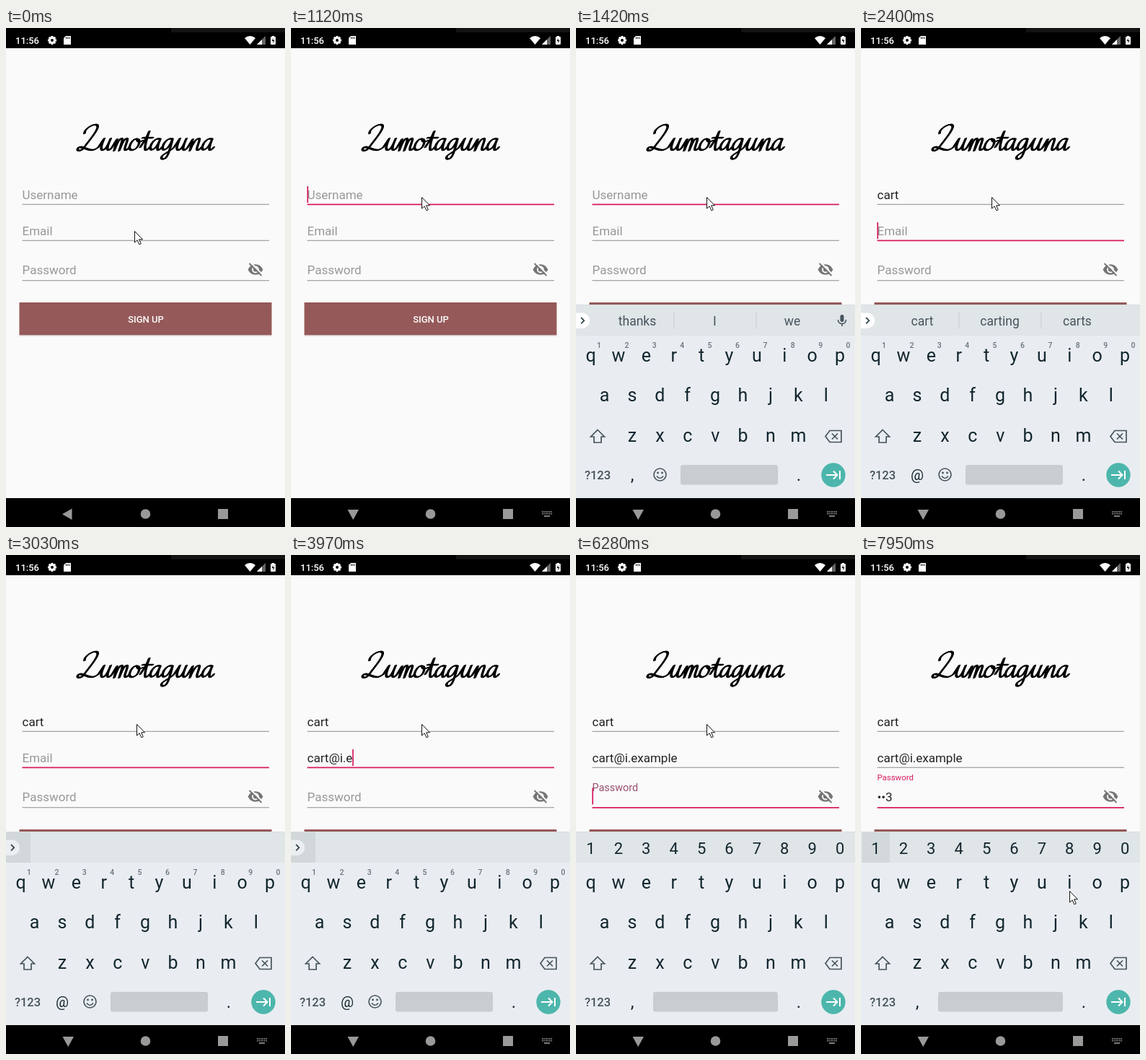
An HTML page with a canvas that plays this animation: 387x691 px, repeating every 8000 ms.

```html
<!DOCTYPE html>
<html lang="en">
<head>
<meta charset="utf-8">
<title>Sign up</title>
<style>
  html, body { margin: 0; width: 100%; height: 100%; overflow: hidden; background: #fafafa; }
  canvas { display: block; width: 387px; height: 691px; }
</style>
</head>
<body>
<canvas id="stage"></canvas>
<script>
const W = 387, H = 691, LOOP = 8000;
const canvas = document.getElementById('stage');
const ctx = canvas.getContext('2d');
const dpr = window.devicePixelRatio || 1;
canvas.width = W * dpr;
canvas.height = H * dpr;

const PINK = '#d81b60', PAPER = '#fafafa', INK = '#12262e', KEY = '#46545b';
const KEY_STEP = 38.4;

// Each entry changes part of the screen state at its time.
const events = [
  [0, { focus: -1, caret: true, values: ['', '', ''], label: 0, slide: 1, layout: 'text', words: ['thanks', 'I', 'we'], mic: true }],
  [700, { focus: 0 }],
  [1120, { typing: true }],
  [1270, { slide: 0.45 }],
  [1420, { slide: 0, caret: false }],
  [1670, { values: ['ca', '', ''], caret: true, words: ['can', 'call', 'car'] }],
  [1820, { values: ['car', '', ''], words: ['car', 'care', 'cars'] }],
  [1980, { values: ['cart', '', ''], words: ['cart', 'carting', 'carts'] }],
  [2250, { focus: 1, layout: 'email', mic: false }],
  [2520, { words: [] }],
  [2650, { pressed: true }],
  [3030, { caret: false }],
  [3560, { values: ['cart', 'ca', ''], caret: true }],
  [3700, { values: ['cart', 'cart', ''], words: ['', 'cart', ''] }],
  [3830, { values: ['cart', 'cart@', ''], words: [] }],
  [3970, { values: ['cart', 'cart@i.e', ''] }],
  [4100, { values: ['cart', 'cart@i.ex', ''] }],
  [4240, { values: ['cart', 'cart@i.exa', ''] }],
  [4830, { caret: false }],
  [4970, { values: ['cart', 'cart@i.exam', ''], caret: true }],
  [5120, { values: ['cart', 'cart@i.examp', ''] }],
  [5270, { values: ['cart', 'cart@i.exampl', ''] }],
  [5410, { values: ['cart', 'cart@i.example', ''] }],
  [5970, { caret: false }],
  [6280, { focus: 2, layout: 'password', caret: true, label: 0.46 }],
  [6400, { label: 0.85 }],
  [6530, { label: 1 }],
  [6670, { values: ['cart', 'cart@i.example', '1'], hit: true }],
  [7070, { values: ['cart', 'cart@i.example', '•2'] }],
  [7500, { values: ['cart', 'cart@i.example', '••3'] }],
  [7950, { caret: false }]
];

const stateAt = t => Object.assign({}, ...events.filter(e => e[0] <= t).map(e => e[1]));
const lerp = (a, b, p) => a + (b - a) * p;
const clamp = v => Math.max(0, Math.min(1, v));

function rect(x, y, w, h, color, r = 0) {
  ctx.fillStyle = color;
  ctx.beginPath();
  if (r) ctx.roundRect(x, y, w, h, r); else ctx.rect(x, y, w, h);
  ctx.fill();
}

function disc(x, y, r, color) {
  ctx.fillStyle = color;
  ctx.beginPath();
  ctx.arc(x, y, r, 0, 7);
  ctx.fill();
}

function text(str, x, y, size, color, align = 'left', weight = 400) {
  ctx.font = `${weight} ${size}px Roboto, sans-serif`;
  ctx.textAlign = align;
  ctx.fillStyle = color;
  ctx.fillText(str, x, y);
}

// Draws an SVG path with its own origin, filled and/or stroked.
function shape(d, x, y, { fill, stroke, width = 1 }) {
  const path = new Path2D(d);
  ctx.save();
  ctx.translate(x, y);
  if (fill) { ctx.fillStyle = fill; ctx.fill(path); }
  if (stroke) { ctx.strokeStyle = stroke; ctx.lineWidth = width; ctx.stroke(path); }
  ctx.restore();
}

// Script letters as joined relative pen strokes.
const bowl = 'm12-11c-6-3-11 4-11 10c0 8 9 6 11-10';
const tail = 'c2 0 3-2 4-4';
const script = {
  L: 'M8-24c-3-8 16-18 16-8c0 8-9 20-12 28c-3 6-10 4-8 0c2-4 12 3 20 3c4 0 6-2 8-4',
  u: 'l5-12c-1 5-3 16 2 16c4 0 6-9 7-16c-1 5-3 16 1 16' + tail,
  n: 'l4-11v16c1-8 4-17 8-17c3 0 1 8 1 12c0 4 1 4 2 4' + tail,
  m: 'l4-11v16c1-8 3-17 6-17c3 0 1 10 1 17c1-8 3-17 6-17c3 0 1 8 1 12c0 4 1 4 2 4' + tail,
  a: bowl + 'c-1 5-2 15 1 15' + tail,
  o: 'm8-11c-5-2-8 5-8 10c0 8 12 6 12-4c0-4-2-6-4-6c1 4 5 4 8 2m-1 9',
  t: 'l5-12l2-10c-1 8-2 26 2 26' + tail + 'm-13-13h14m-1 13',
  g: bowl + 'c0 8 0 20-2 24c-2 5-8 4-7 0c1-4 9-6 14-13'
};
const wordmark = new Path2D([...'Lumotaguna'].map(c => script[c]).join(''));

function drawTitle() {
  ctx.save();
  ctx.transform(1, 0, -0.25, 1, 95, 170);
  ctx.strokeStyle = '#000';
  ctx.lineWidth = 1.7;
  ctx.lineCap = ctx.lineJoin = 'round';
  for (const i of [-1, 0, 1]) {
    ctx.save();
    ctx.translate(i * 0.9, -i * 0.4);
    ctx.stroke(wordmark);
    ctx.restore();
  }
  ctx.restore();
}

function drawStatusBar() {
  rect(0, 0, W, 28, '#000');
  rect(229, 0, W - 229, 6, '#131313');
  text('11:56', 13, 22, 13, '#fff', 'left', 500);
  for (let i = 0; i < 4; i++) {
    ctx.save();
    ctx.translate(64, 17);
    ctx.rotate(i * Math.PI / 4);
    rect(-1.5, -6, 3, 12, '#fff');
    ctx.restore();
  }
  disc(64, 17, 4.7, '#fff');
  disc(64, 17, 2, '#000');
  shape('M3 0H10V12H0V3Z', 80, 11, { fill: '#fff' });
  for (const x of [83, 85.2, 87.4]) rect(x, 12.5, 1, 2.5, '#000');
  shape('M0 3Q7.5-3 15 3L7.5 12Z', 331, 11, { fill: '#fff' });
  shape('M0 12L12 0V12Z', 348, 11, { fill: '#666' });
  shape('M0 12L7 5V12Z', 348, 11, { fill: '#fff' });
  rect(367, 12, 7, 11, '#fff', 1);
  rect(369, 11, 3, 2, '#fff');
  shape('M2 0L0 4H2V7L4 3H2Z', 368.6, 14, { fill: '#000' });
}

function drawNavBar(typing) {
  const gray = '#999';
  rect(0, 651, W, 40, '#000');
  shape(typing ? 'M78.5 667H94L86.2 681Z' : 'M91.5 665.5V681L78 673.2Z', 0, 0, { fill: gray });
  disc(193.5, 673, 6.8, gray);
  rect(294, 666, 14, 14, gray);
  if (!typing) return;
  for (let row = 0; row < 2; row++)
    for (let i = 0; i < 6; i++) rect(348 + i * 2.5, 669 + row * 2.8, 1.6, 1.7, '#888');
  rect(351, 675, 8, 1.8, '#888');
}

function drawEye() {
  const gray = '#757575';
  shape('M-10.5 0Q-7-7.2 0-7.2T10.5 0Q7 7.2 0 7.2T-10.5 0Z', 346, 334.5, { fill: gray });
  disc(346, 334.5, 4.9, PAPER);
  disc(346, 334.5, 3, gray);
  shape('M-7-10L10 7', 346, 334.5, { stroke: PAPER, width: 2 });
  shape('M-8.5-8.5L8.5 8.5', 346, 334.5, { stroke: gray, width: 1.8 });
}

const fields = [
  { hint: 'Username', base: 237, line: 243.5 },
  { hint: 'Email', base: 287, line: 293.5 },
  { hint: 'Password', base: 340.5, line: 349 }
];

function drawField({ hint, base, line }, i, s) {
  const value = s.values[i], focused = s.focus === i;
  const p = i === 2 ? s.label : 0;
  if (p) {
    text(hint, 22.5, lerp(340.5, 312, p), lerp(17, 11.4, p), p < 0.5 ? '#9a4f70' : PINK);
  } else if (!value) {
    text(hint, 22.5, base, 17, '#989898');
  }
  text(value, 22.5, base, 17, '#212121');
  if (focused) rect(22.5, line, 342.5, 1.8, PINK);
  else rect(22.5, line + 0.3, 342.5, 1, '#8a8a8a');
  if (focused && s.caret) rect(22.3 + ctx.measureText(value).width, base - 18, 1.7, 23, PINK);
}

function drawForm(s) {
  drawTitle();
  fields.forEach((f, i) => drawField(f, i, s));
  drawEye();
  rect(18.5, 381, 350, 46, '#e3e0e0');
  rect(18.5, 380, 350, 45.3, '#955959');
  text('SIGN UP', 194, 408, 13, '#fff', 'center', 500);
}

function drawSuggestions(s) {
  if (s.pressed) rect(0, 384, 34, 42, '#d2d7da');
  rect(-10, 394.5, 29, 21.5, s.pressed ? '#eceff1' : '#fff', 10.7);
  shape('M0 0L4.2 4.2L0 8.4', 7, 401, { stroke: '#37474f', width: 1.8 });
  s.words.forEach((word, i) => text(word, 85 + i * 107.5, 412, 17.5, KEY, 'center'));
  if (s.words.length) for (const x of [135.5, 249.5]) rect(x, 394, 1, 22, '#c6ccd0');
  if (s.mic) {
    rect(366.5, 397, 5, 10, KEY, 2.5);
    shape('M-5.5 0C-5.5 7.5 5.5 7.5 5.5 0M0 5.5V9', 369, 404, { stroke: KEY, width: 1.6 });
  }
}

function keyRow(keys, x, y, size = 25) {
  [...keys].forEach((k, i) => text(k, x + i * KEY_STEP, y, size, INK, 'center'));
}

function drawKeyboard(s) {
  const password = s.layout === 'password';
  ctx.save();
  ctx.beginPath();
  ctx.rect(0, 380, W, 271);
  ctx.clip();
  ctx.translate(0, s.slide * 267);
  rect(0, 383, W, 1, '#d9dddf');
  rect(0, 384, W, 42, '#e0e5e8');
  rect(0, 426, W, 225, '#e9edf1');

  if (password) {
    if (s.hit) rect(1.5, 384, 38.5, 42, '#d3d8db');
    keyRow('1234567890', 20.5, 414, 22);
  } else {
    drawSuggestions(s);
    [...'1234567890'].forEach((d, i) => text(d, 32 + i * KEY_STEP, 443, 10.5, '#68757b', 'center', 500));
  }
  keyRow('qwertyuiop', 20.5, 461.5);
  keyRow('asdfghjkl', 39.5, 517);
  keyRow('zxcvbnm', 78, 572.5);

  shape('M0-9.5L9.5 0H5V8H-5V0H-9.5Z', 30, 566, { stroke: KEY, width: 1.7 });
  shape('M-11 0L-5-8H11V8H-5ZM-2-4L6 4M6-4L-2 4', 357, 565.5, { stroke: KEY, width: 1.7 });

  text('?123', 30, 625, 16.5, KEY, 'center', 500);
  if (s.layout === 'email') text('@', 78, 626, 20, INK, 'center');
  else text(',', 78, 627, 24, INK, 'center');
  text('.', 309, 627, 24, INK, 'center');
  if (!password) {
    shape('M8.5 0A8.5 8.5 0 1 1-8.5 0A8.5 8.5 0 1 1 8.5 0M-4.5 2Q0 8 4.5 2', 116.5, 618.5, { stroke: KEY, width: 1.6 });
    disc(113.5, 616, 1.4, KEY);
    disc(119.5, 616, 1.4, KEY);
  }
  const left = password ? 107 : 145;
  rect(left, 605, 280 - left, 27.5, '#c9cdd0', 3);
  disc(357, 619, 16.7, '#4db6ac');
  shape('M-10 0H5M0-5.5L5.5 0L0 5.5M9-6V6', 357, 619, { stroke: '#fff', width: 2 });
  ctx.restore();
}

// The pointer advances in even hops.
function pointerAt(t) {
  const hops = (start, gap, count) => clamp((Math.floor((t - start) / gap) + 1) / count);
  const up = hops(150, 140, 4), down = hops(7650, 150, 3);
  const ease = p => p * p * (3 - 2 * p);
  return [178.5 + 3 * ease(up) + 108 * ease(down), 281.5 - 47 * ease(up) + 231 * ease(down)];
}

function drawPointer(t) {
  const [x, y] = pointerAt(t);
  shape('M0 0V15.5L3.6 12.2L6.4 18.3L8.8 17.2L6.1 11.3H11Z', x, y, { fill: '#fff', stroke: '#111', width: 1 });
}

function draw(t) {
  const s = stateAt(t);
  ctx.setTransform(dpr, 0, 0, dpr, 0, 0);
  rect(0, 0, W, H, PAPER);
  drawForm(s);
  if (s.slide < 1) drawKeyboard(s);
  drawStatusBar();
  drawNavBar(s.typing);
  drawPointer(t);
}

const began = performance.now();
function tick() {
  draw((performance.now() - began) % LOOP);
  requestAnimationFrame(tick);
}
tick();
</script>
</body>
</html>
```
